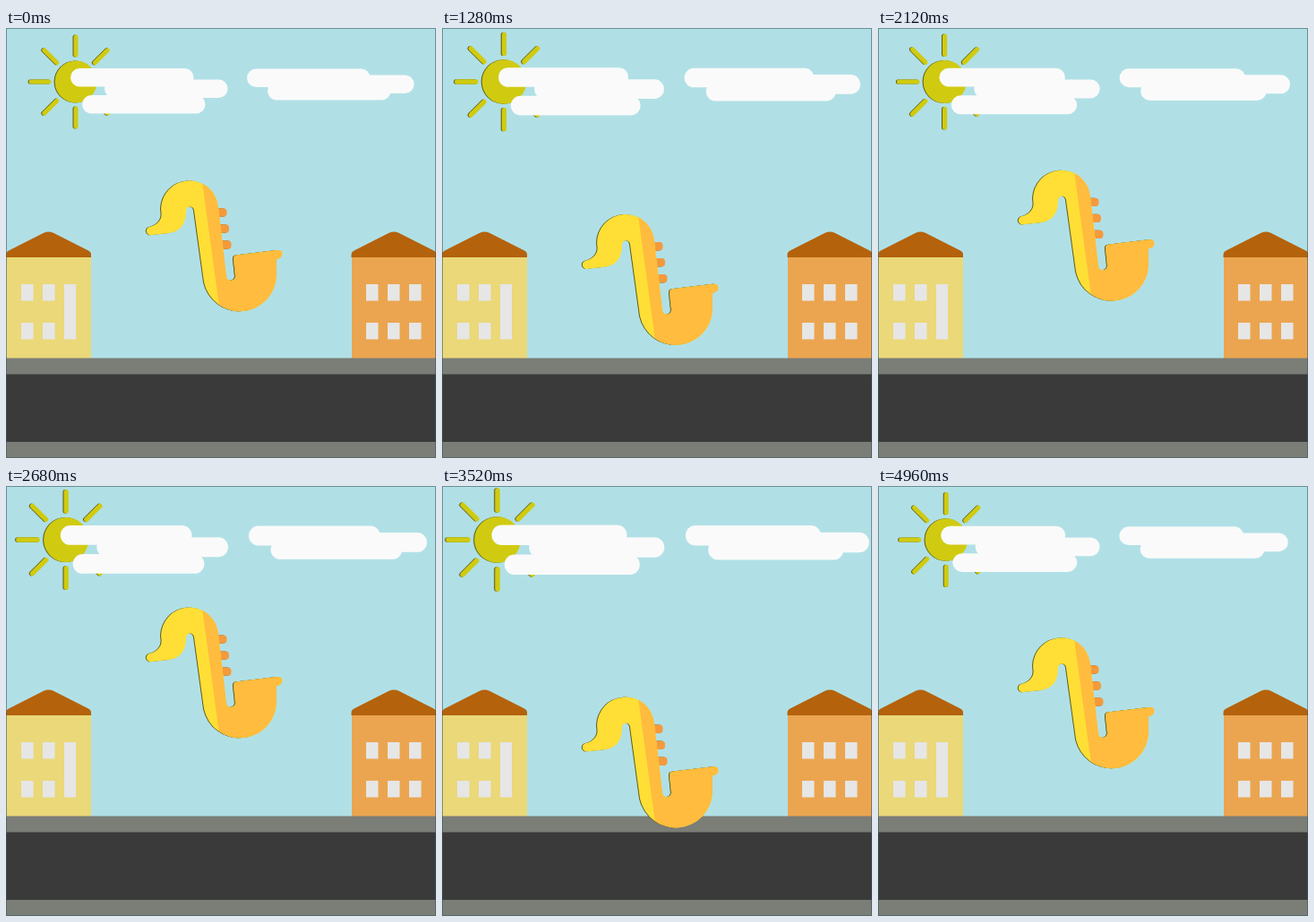
Write an HTML page that moves like this. It is 480 by 480 pixels and loops after 5 s.

```html
<!DOCTYPE html>
<html lang="en">
<head>
<meta charset="utf-8">
<title>Saxophone street</title>
<style>
html, body { margin: 0; width: 100%; height: 100%; overflow: hidden; background: #b0e0e6; }
svg { display: block; width: 100vw; height: 100vh; }
.shade { filter: drop-shadow(-.6px .6px 0 #5c5a1c); }
</style>
</head>
<body>
<svg viewBox="0 0 480 480">
  <defs>
    <path id="horn" d="M160 222C169 220 174 214 173.500 207L173 202A32 32 0 0 1 236.700 198L246 277
      A5 5 0 0 0 256 277L254 258Q253.700 254 257.500 253.500L303 248Q308 247.500 308.500 252Q308.500 257 302 258V277
      A41 41 0 0 1 221 284L210 204A4.500 4.500 0 0 0 201 204C201 221 193 227 182 229L163 231A4.500 4.500 0 0 1 160 222Z"/>
    <clipPath id="half"><path d="M217.400 160H330V330H240.600Z"/></clipPath>
    <path id="roof" d="M0 256V253Q0 249.500 4 248L42 228.800Q47.500 226 53 228.800L91 248Q95 249.500 95 253V256Z"/>
  </defs>
  <rect width="480" height="480" fill="#b0e0e6"/>
  <g id="weather">
    <g id="sun" class="shade" fill="#d0cb10" stroke="#d0cb10" stroke-width="5" stroke-linecap="round"></g>
    <g id="clouds" fill="#fafafa"></g>
  </g>
  <rect y="256" width="95" height="113" fill="#ead879"/>
  <rect x="386" y="256" width="94" height="113" fill="#eba550"/>
  <g fill="#b5620c">
    <use href="#roof"/>
    <use href="#roof" x="385.500"/>
  </g>
  <g id="windows" fill="#e6e6e6"></g>
  <rect y="368.500" width="480" height="112" fill="#7b7d77"/>
  <rect y="386.500" width="480" height="75.500" fill="#3a3a3a"/>
  <rect x=".5" y=".5" width="479" height="479" fill="none" stroke="#3c5a60" stroke-opacity=".6"/>
  <g id="sax" class="shade">
    <g id="keys" fill="#f59a3c"></g>
    <use href="#horn" fill="#ffdf35"/>
    <use href="#horn" fill="#ffbc3e" clip-path="url(#half)"/>
  </g>
</svg>
<script>
const $ = id => document.getElementById(id);

function add(parent, tag, attrs) {
  const el = document.createElementNS("http://www.w3.org/2000/svg", tag);
  for (const k in attrs) el.setAttribute(k, attrs[k]);
  $(parent).appendChild(el);
}
const box = (parent, x, y, width, height, rx = 0) => add(parent, "rect", { x, y, width, height, rx });

add("sun", "circle", { cx: 78, cy: 60, r: 23.5, stroke: "none" });
for (let i = 0; i < 8; i++) {
  const c = Math.cos(i * Math.PI / 4), s = Math.sin(i * Math.PI / 4);
  add("sun", "line", { x1: 78 + 30 * c, y1: 60 + 30 * s, x2: 78 + 50 * c, y2: 60 + 50 * s });
}
for (const [x, y] of [[72, 45], [110, 57.5], [85, 75], [269, 45.5], [318, 52.5], [292, 60]])
  box("clouds", x, y, 137.5, 20.5, 10.25);
for (const y of [286, 329]) {
  for (const x of [17, 41, 402, 426, 450]) box("windows", x, y, 13.5, 18.5);
}
box("windows", 65, 286, 13, 61.5);
for (const [x, y] of [[241, 206], [243.5, 224], [246, 242]]) box("keys", x - 8, y - 4.7, 13.5, 9.4, 4);

const LOOP = 5000, LAG = 15;
const lerp = (a, b, p) => a + (b - a) * p;

// Piecewise linear bounce: up, down past the start, back
function bounce(t) {
  const m = t % 2000;
  if (m < 500) return lerp(0, -55, m / 500);
  if (m < 1500) return lerp(-55, 66, (m - 500) / 1000);
  return lerp(66, 0, (m - 1500) / 500);
}

function pulse(t) {
  const p = (t % 1000) / 500;
  return 1 + 0.1 * (p < 1 ? p : 2 - p);
}

function draw(time) {
  const t = Math.max(0, time % LOOP - LAG);
  $("sax").setAttribute("transform", `translate(0 ${bounce(t)})`);
  $("weather").setAttribute("transform", `translate(240 60) scale(${pulse(t)}) translate(-240 -60)`);
}

const start = performance.now();
function tick() {
  draw(performance.now() - start);
  requestAnimationFrame(tick);
}
tick();
</script>
</body>
</html>
```
